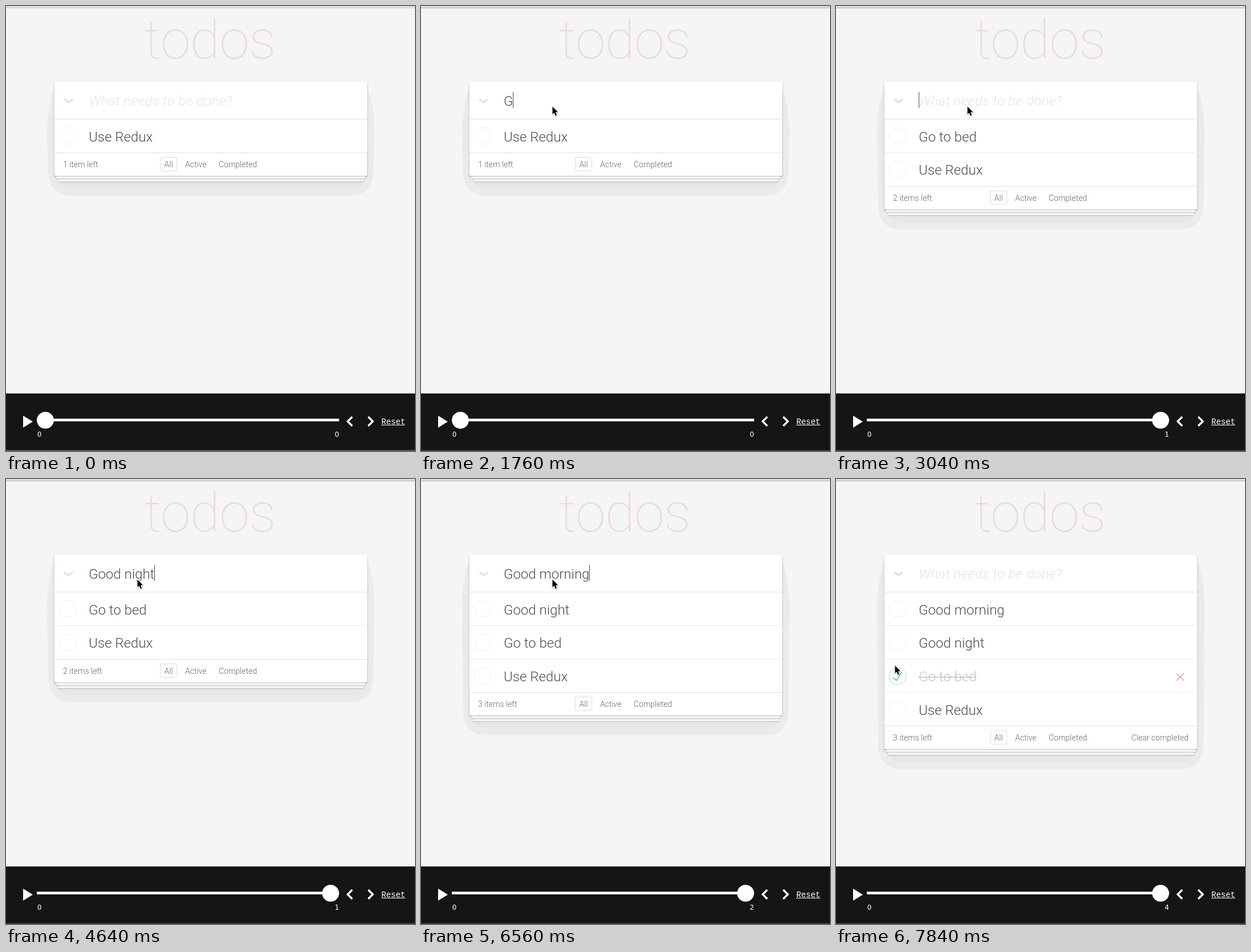
Animation of 717 by 781 pixels, one loop 8000 ms. Source, as an HTML page with a canvas:

```html
<!DOCTYPE html>
<html lang="en">
<head>
<meta charset="utf-8">
<title>todos</title>
<style>
  html, body { margin: 0; width: 100%; height: 100%; overflow: hidden; background: #f5f5f5; }
  canvas { display: block; }
</style>
</head>
<body>
<canvas id="stage" width="717" height="781"></canvas>
<script>
const ctx = document.getElementById('stage').getContext('2d');
const W = 717, H = 781, LOOP = 8000, TICK = 160;
const SANS = 'Roboto, "Liberation Sans", sans-serif';
const CARD = { left: 85, right: 633, top: 133, listTop: 198.3, row: 58.7 };
const FOCUS = 8, BLUR = 47, CHECK = 48;

// Each entry: tick of the keystroke -> number of letters typed so far.
const entries = [
  { text: 'Go to bed', keys: { 11: 1, 12: 2, 13: 4, 14: 5, 15: 6, 17: 7, 18: 9 }, enter: 19 },
  { text: 'Good night', keys: { 22: 1, 23: 2, 24: 4, 25: 5, 26: 6, 27: 7, 28: 9, 29: 10 }, enter: 31 },
  { text: 'Good morning', keys: { 33: 1, 34: 2, 35: 4, 36: 5, 37: 6, 38: 7, 39: 9, 40: 10, 41: 12 }, enter: 42 }
];

// Pointer stops as tick: [x, y]
const pointerStops = {
  1: [296, 94], 2: [266, 130], 3: [240, 162], 4: [230, 176],
  43: [172, 228], 44: [60, 292], 45: [2, 330], 46: [96, 338], 47: [103, 327]
};

function latest(map, tick) {
  let value;
  for (const key in map) if (+key <= tick) value = map[key];
  return value;
}

function stateAt(time) {
  const tick = Math.floor(time / TICK);
  const items = ['Use Redux'];
  let typed = '';
  for (const entry of entries) {
    if (tick >= entry.enter) items.unshift(entry.text);
    else typed += entry.text.slice(0, latest(entry.keys, tick) || 0);
  }
  const checked = tick >= CHECK;
  return {
    items, typed, checked,
    active: tick >= FOCUS,
    caret: tick >= FOCUS && tick < BLUR,
    pointer: latest(pointerStops, tick),
    fade: Math.min(1, Math.max(0, (tick * TICK - 7600) / 400)),
    moves: items.length - 1 + (checked ? 1 : 0)
  };
}

function rect(x, y, w, h, color) {
  ctx.fillStyle = color;
  ctx.fillRect(x, y, w, h);
}

function text(str, x, y, font, color, align = 'left', spacing = '0px') {
  ctx.font = font;
  ctx.letterSpacing = spacing;
  ctx.fillStyle = color;
  ctx.textAlign = align;
  ctx.fillText(str, x, y);
  ctx.letterSpacing = '0px';
}

function line(points, width, color) {
  ctx.beginPath();
  points.forEach(([x, y]) => ctx.lineTo(x, y));
  ctx.lineWidth = width;
  ctx.strokeStyle = color;
  ctx.stroke();
}

function polygon(points, color) {
  ctx.beginPath();
  points.forEach(([x, y]) => ctx.lineTo(x, y));
  ctx.closePath();
  ctx.fillStyle = color;
  ctx.fill();
}

function disc(x, y, r, color) {
  ctx.beginPath();
  ctx.arc(x, y, r, 0, Math.PI * 2);
  ctx.fillStyle = color;
  ctx.fill();
}

function sheet(left, top, right, bottom, color, dy, blur) {
  ctx.save();
  ctx.shadowColor = 'rgba(0,0,0,.2)';
  ctx.shadowOffsetY = dy;
  ctx.shadowBlur = blur;
  rect(left, top, right - left, bottom - top, color);
  ctx.restore();
}

// Wide soft shadow, shown as two flat bands.
function softShadow(bottom) {
  const mid = 359, low = bottom + 35;
  ctx.fillStyle = '#ebebeb';
  ctx.beginPath();
  ctx.moveTo(mid, 140);
  ctx.lineTo(mid + 273, 140);
  ctx.bezierCurveTo(mid + 281, 160, mid + 287, 190, mid + 287, 225);
  ctx.lineTo(mid + 285, low - 42);
  ctx.bezierCurveTo(mid + 284, low - 14, mid + 270, low, mid + 243, low);
  ctx.lineTo(mid - 243, low);
  ctx.bezierCurveTo(mid - 270, low, mid - 284, low - 14, mid - 285, low - 42);
  ctx.lineTo(mid - 287, 225);
  ctx.bezierCurveTo(mid - 287, 190, mid - 281, 160, mid - 273, 140);
  ctx.fill();
  ctx.fillStyle = '#e6e6e6';
  ctx.beginPath();
  ctx.roundRect(88, 200, 543, bottom + 22 - 200, 24);
  ctx.fill();
}

function drawHeader(s) {
  text('todos', 357.5, 92, `100 95px ${SANS}`, '#edd8d8', 'center', '-0.5px');
  line([[102.5, 163.5], [109.5, 169], [117, 163.5]], 3, '#dfdfdf');
  const font = `300 24px ${SANS}`;
  if (s.typed) text(s.typed, 145, 175, font, '#4d4d4d');
  else text('What needs to be done?', 145, 175, `italic ${font}`, '#e4e4e4', 'left', '0.3px');
  if (s.caret) {
    ctx.font = font;
    rect(Math.round(145 + ctx.measureText(s.typed).width), 151, 1, 28, '#4d4d4d');
  }
}

function drawCheck(y) {
  const k = 0.296;
  const shape = [[72, 25], [42, 71], [27, 56], [23, 60], [43, 80], [77, 28]];
  polygon(shape.map(([px, py]) => [108 + (px - 50) * k, y + (py - 50) * k]), '#5dc2af');
}

function drawItem(s, label, i) {
  const top = Math.round(CARD.listTop + CARD.row * i);
  const done = s.checked && label === 'Go to bed';
  const cy = top + 30;
  const baseline = Math.round(237.6 + CARD.row * i);
  rect(CARD.left, top, CARD.right - CARD.left, 1, i ? '#ebebeb' : '#e0e0e0');

  ctx.beginPath();
  ctx.arc(108, cy, 14.8, 0, Math.PI * 2);
  ctx.lineWidth = 1;
  ctx.strokeStyle = done ? '#bddad5' : '#eeeeee';
  ctx.stroke();
  if (done) drawCheck(cy);

  const ease = done ? 1 - (1 - s.fade) ** 2 : 0;
  const tone = Math.round(77 + 140 * ease);
  const color = `rgb(${tone},${tone},${tone})`;
  text(label, 145, baseline, `300 24px ${SANS}`, color);
  if (done) rect(145, baseline - 8, ctx.measureText(label).width, 1.5, color);

  if (!s.pointer) return;
  const [px, py] = s.pointer;
  if (px >= CARD.left && px < CARD.right && py >= top && py < top + CARD.row) {
    const x = 603.5, y = top + 31.5, d = 6.3;
    line([[x - d, y - d], [x + d, y + d]], 1.3, '#cc9a9a');
    line([[x + d, y - d], [x - d, y + d]], 1.3, '#cc9a9a');
  }
}

function drawFooter(s, bottom) {
  const left = s.items.length - (s.checked ? 1 : 0);
  const font = `300 14px ${SANS}`, color = '#666', y = bottom - 15;
  rect(CARD.left, bottom - 41, CARD.right - CARD.left, 1, '#e2e2e2');
  text(`${left} item${left === 1 ? '' : 's'} left`, 100, y, font, color);
  text('All', 285, y, font, color, 'center');
  text('Active', 314, y, font, color);
  text('Completed', 373, y, font, color);
  if (s.checked) text('Clear completed', 618, y, font, color, 'right');
  ctx.beginPath();
  ctx.roundRect(270.5, bottom - 32.5, 29, 24, 3);
  ctx.lineWidth = 1;
  ctx.strokeStyle = '#ecd5d5';
  ctx.stroke();
}

function drawCard(s) {
  const { left, right, top } = CARD;
  const bottom = Math.round(239.2 + CARD.row * s.items.length);
  softShadow(bottom);
  sheet(left, top, right, bottom, '#fff', 2, 4);
  sheet(left + 6, bottom - 30, right - 6, bottom + 10, '#f6f6f6', 1, 2);
  sheet(left + 3, bottom - 30, right - 3, bottom + 5, '#f6f6f6', 1, 1);
  sheet(left, bottom - 40, right, bottom, '#fff', 1, 1);
  rect(left, top, right - left, bottom - top, '#fff');
  s.items.forEach((label, i) => drawItem(s, label, i));
  drawFooter(s, bottom);
}

function drawPlayer(s) {
  const white = '#fff', digits = '12px "DejaVu Sans", sans-serif';
  rect(0, 680, W, 99, '#151515');
  rect(0, 779, W, 2, s.active ? '#383532' : '#55524e');
  polygon([[30, 719], [47, 729.5], [30, 740]], white);
  rect(54, 724.3, 530, 4.7, white);
  disc(s.moves ? 569 : 69, 727, 14.8, white);
  text('0', 58.5, 756, digits, white, 'center');
  text(s.moves, 580, 756, digits, white, 'center');
  line([[607, 721], [599, 729], [607, 737]], 3.4, white);
  line([[635, 721], [643, 729], [635, 737]], 3.4, white);
  text('Reset', 658, 734, '14px "Liberation Mono", monospace', white);
  rect(658, 735, 42, 1, white);
}

function drawPointer([x, y]) {
  const arrow = [[0, 0], [0, 13.5], [3, 10.8], [5.2, 16], [7.6, 15], [5.4, 10], [9.6, 9.8]];
  const points = arrow.map(([dx, dy]) => [x + 0.5 + dx, y + 0.5 + dy]);
  ctx.save();
  ctx.shadowColor = 'rgba(0,0,0,.3)';
  ctx.shadowBlur = 2;
  ctx.shadowOffsetY = 1;
  line([...points, points[0]], 2, '#fff');
  ctx.restore();
  polygon(points, '#000');
}

function draw() {
  const s = stateAt(performance.now() % LOOP);
  rect(0, 0, W, H, '#f5f5f5');
  rect(0, 0, W, 3, '#dfdfdf');
  rect(0, 3, W, 1, s.active ? '#b2b2b2' : '#cdcdcd');
  drawCard(s);
  drawHeader(s);
  drawPlayer(s);
  if (s.pointer) drawPointer(s.pointer);
  requestAnimationFrame(draw);
}
draw();
</script>
</body>
</html>
```
